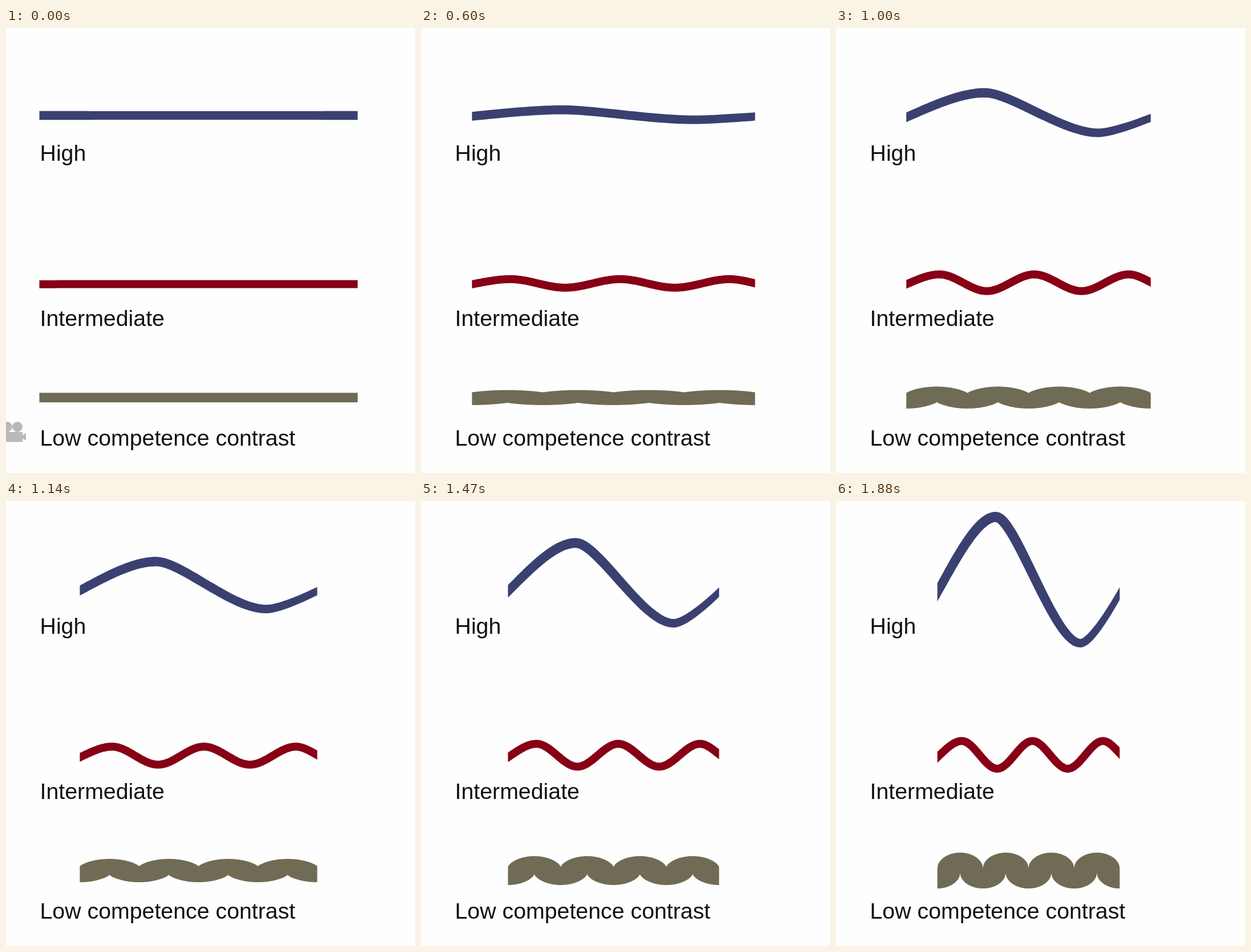
Recreate the animation shown at these times as an HTML page with a canvas. Size 717 by 781 pixels, loop 2.01 s.

```html
<!DOCTYPE html>
<html lang="en">
<head>
<meta charset="utf-8">
<title>Contrast waves</title>
<style>
html, body { margin: 0; width: 100%; height: 100%; overflow: hidden; background: #fefefe; }
canvas { display: block; }
</style>
</head>
<body>
<canvas id="stage" width="717" height="781"></canvas>
<script>
const ctx = document.getElementById('stage').getContext('2d');
const LOOP = 2010, TICK = 67, LAST = 19;
const CENTER = 337.5, GREY = '#b9b9b9';

// Rest first, then one step per tick, holding every fifth tick twice
function stepAt(t) {
  const tick = Math.floor((t + 8) / TICK);
  return Math.min(LAST, Math.max(0, tick - 4 - Math.floor((tick - 1) / 5)));
}

// The bands shrink by the same ratio each step
const widthAt = s => 558 * Math.pow(0.9711, s);

// Starts slowly, then grows evenly
const ramp = (s, lag) => s * s / (s + lag);

const bez = (a, b, c, d, t) => {
  const v = 1 - t;
  return a * v * v * v + 3 * b * v * v * t + 3 * c * v * t * t + d * t * t * t;
};

function fill(pts, color) {
  ctx.fillStyle = color;
  ctx.beginPath();
  pts.forEach(([x, y]) => ctx.lineTo(x, y));
  ctx.fill();
}

// Band through [x, y, thickness] knots, level at inner knots, cut upright at both ends
function ribbon(knots, color, out, back) {
  const EDGE = 0.33, LEAN = 1.4, PAD = 24, N = 28;
  const last = knots.length - 1, pts = [];
  for (let i = 0; i < last; i++) {
    const [x0, y0, w0] = knots[i], [x1, y1, w1] = knots[i + 1];
    const dx = x1 - x0, dy = y1 - y0, slope = LEAN * dy / dx;
    const first = i === 0, final = i === last - 1;
    const h0 = dx * (first ? EDGE : out), h1 = dx * (final ? EDGE : back);
    if (first) pts.push([x0 - PAD, y0 - PAD * slope, w0]);
    for (let k = first ? 0 : 1; k <= N; k++) {
      const t = k / N;
      pts.push([
        bez(x0, x0 + h0, x1 - h1, x1, t),
        bez(y0, first ? y0 + h0 * slope : y0, final ? y1 - h1 * slope : y1, y1, t),
        w0 + (w1 - w0) * t
      ]);
    }
    if (final) pts.push([x1 + PAD, y1 + PAD * slope, w1]);
  }
  const side = sign => pts.map(([x, y, w], i) => {
    const p = pts[Math.max(0, i - 1)], q = pts[Math.min(pts.length - 1, i + 1)];
    const dx = q[0] - p[0], dy = q[1] - p[1];
    const r = sign * w / 2 / Math.hypot(dx, dy);
    return [x + dy * r, y - dx * r];
  });
  ctx.save();
  ctx.beginPath();
  ctx.rect(knots[0][0], 0, knots[last][0] - knots[0][0], 781);
  ctx.clip();
  fill(side(1).concat(side(-1).reverse()), color);
  ctx.restore();
}

// One wide wave
function drawHigh(s) {
  const base = 153.5, w = widthAt(s), x = CENTER - w / 2;
  const rise = 11.9 * ramp(s, 15.2);
  ribbon([
    [x, base + 0.36 * s, 15.5],
    [x + 0.321 * w, base - rise, 15 + 0.16 * s],
    [x + 0.784 * w, base + 0.765 * rise, 15],
    [x + w, base + 0.46 * s, 15.5 - 0.25 * s]
  ], '#3a4070', 0.23, 0.31);
}

// Two and a half waves
function drawMedium(s) {
  const base = 449.5, w = widthAt(s), x = CENTER - w / 2;
  const rise = 70.5 * s / (s + 28.3), half = 0.1935 * w;
  const knots = [[x, base + 0.3, 14]];
  for (let i = -2; i <= 2; i++) {
    knots.push([350 - 0.3 * s + i * half, i % 2 ? base + 0.72 * rise : base - rise, 14]);
  }
  knots.push([x + w, base - 0.36 * s, 14]);
  ribbon(knots, '#870015', 0.34, 0.34);
}

// Four arches above, the same arches half a period later below
function drawLow(s) {
  const N = 480, base = 648.6, w = widthAt(s), x0 = CENTER - w / 2;
  const reach = 8.3 + 1.22 * s, notch = 1.64 * ramp(s, 2.6), power = 1.05 - 0.028 * s;
  const edge = u => reach - notch * (1 - Math.pow(1 - (2 * (u % 1) - 1) ** 2, power));
  const top = [], low = [];
  for (let i = 0; i <= N; i++) {
    const u = 4 * i / N, x = x0 + w * i / N;
    top.push([x, base - edge(u)]);
    low.push([x, base + edge(u + 0.5)]);
  }
  fill(top.concat(low.reverse()), '#706b54');
}

function drawCamera() {
  ctx.fillStyle = GREY;
  ctx.beginPath();
  ctx.arc(2, 700, 9, 0, 7);
  ctx.arc(20, 700, 9, 0, 7);
  ctx.fill();
  ctx.fillRect(0, 709, 29, 17.5);
  fill([[28, 715], [35, 711], [35, 724], [28, 720]], GREY);
}

function drawLabels() {
  ctx.fillStyle = '#111';
  ctx.font = '39.3px "Liberation Sans", Arial, sans-serif';
  ctx.fillText('High', 59.5, 233);
  ctx.fillText('Intermediate', 59.5, 522.5);
  ctx.fillText('Low competence contrast', 59.5, 732.5);
}

function frame() {
  const s = stepAt(performance.now() % LOOP);
  ctx.fillStyle = '#fefefe';
  ctx.fillRect(0, 0, 717, 781);
  drawHigh(s);
  drawMedium(s);
  drawLow(s);
  if (s === 0) drawCamera();
  drawLabels();
  requestAnimationFrame(frame);
}
frame();
</script>
</body>
</html>
```
